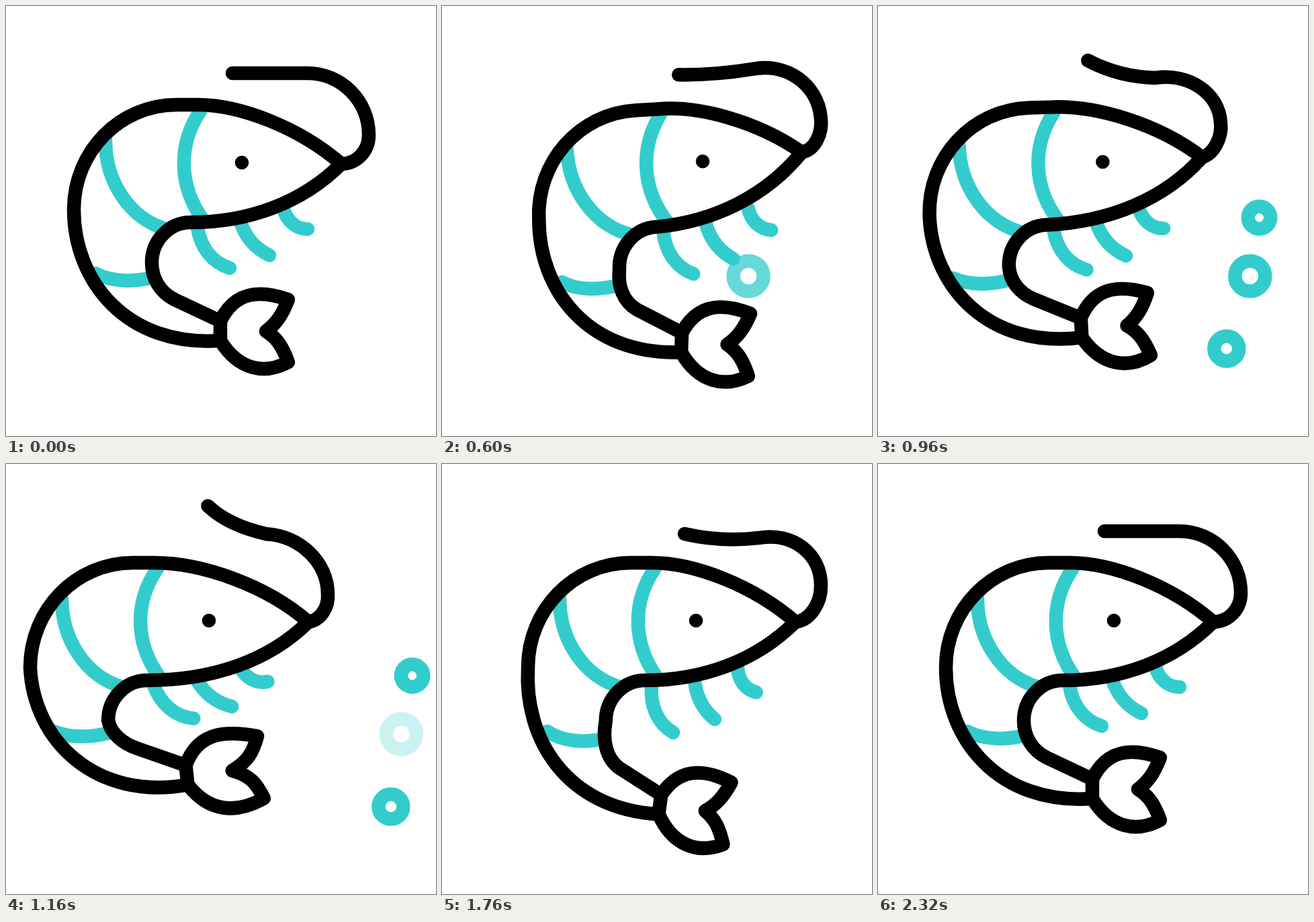
Animation, 640 px wide and 640 px high, one loop 2600 ms. Source, as an HTML page with a canvas:

```html
<!DOCTYPE html>
<html>
<head>
<meta charset="utf-8">
<style>
  html, body { margin: 0; height: 100%; overflow: hidden; background: #fff; }
  canvas { display: block; width: 100vmin; height: 100vmin; }
</style>
</head>
<body>
<canvas id="stage" width="640" height="640"></canvas>
<script>
const ctx = document.getElementById('stage').getContext('2d');
const LOOP = 2600, STEP = 40, WIDTH = 20.5, TEAL = '#3cc';

// The resting shape, as chains of cubic curves.
const feeler = [337,100, 374,100, 411,100, 448,100, 499,100, 540,141, 540,192, 540,216, 522,235, 499,235];
const back = [499,235, 438,182, 350,147, 285,147, 254,147, 169,147, 101,217, 101,303, 101,410, 180,508, 319,498];
const belly = [499,235, 440,294, 360,322, 275,322, 243,322, 217,349, 217,382, 217,405, 229,426, 251,437, 319,469];
const fin = [319,469, 340,426, 375,421, 420,437, 411,460, 402,473, 387,484,
  403,494, 411,506, 420,530, 385,549, 346,542, 319,498];
const bands = [
  [290,155, 256,205, 256,266, 293,318],
  [148,200, 148,262, 184,316, 238,332],
  [133,398, 158,411, 190,411, 218,404]
];
const legs = [
  [285,330, 290,360, 307,382, 333,390],
  [349,322, 357,345, 371,361, 392,371],
  [413,302, 418,320, 432,332, 449,332]
];
const EYE = [351, 233], BODY = [200, 300], TAIL_ROOT = [130, 330];

// The rig is at rest at the first and last key time.
const times = [200, 600, 800, 1160, 1480, 1760, 2320];
const rig = {
  headX: [37, 16, -49, -14, 27],
  bodyX: [43, 16, -65, -24, 27],
  tilt: [-6, -5.8, 0, 0, 0],      // head, in degrees
  turn: [2, 0, -6, -0.6, 7.5],    // tail, in degrees
  swing: [6, 9, -12, -7, 14],     // legs, in degrees
  wave: [8, 18, 9, 6, 16],        // feeler: height of its wave,
  curl: [0, 0, 1.6, 1.35, 0],     // phase of the wave and lift of the tip,
  pull: [8, 9, 12, 7, 3]          // drag to the left
};

const bubbles = [
  { start: 600, from: 519, to: 616, y: 315, r: 16.75 },
  { start: 480, from: 446.5, to: 589.5, y: 402, r: 22.5 },
  { start: 680, from: 476.5, to: 605, y: 510, r: 18.5 }
];
const LIFE = 720, FADE = 160;

const clamp = v => Math.max(0, Math.min(1, v));
const mix = (a, b, w) => a.map((v, i) => v + (b[i] - v) * w);

function rotate([x, y], [cx, cy], degrees) {
  const a = degrees * Math.PI / 180, c = Math.cos(a), s = Math.sin(a);
  return [cx + (x - cx) * c - (y - cy) * s, cy + (x - cx) * s + (y - cy) * c];
}

function warp(numbers, move) {
  const points = [];
  for (let i = 0; i < numbers.length; i += 2)
    points.push(move([numbers[i], numbers[i + 1]], i / 2));
  return points;
}

// Smooth curve through the key values, flat at both ends.
function keyed(keys, t) {
  const last = times.length - 1, v = [0, ...keys, 0];
  if (t <= times[0] || t >= times[last]) return 0;
  const slope = k => {
    if (k === 0 || k === last) return 0;
    const a = times[k] - times[k - 1], b = times[k + 1] - times[k];
    return ((v[k] - v[k - 1]) / a * b + (v[k + 1] - v[k]) / b * a) / (a + b);
  };
  const k = times.findIndex(time => time > t) - 1;
  const h = times[k + 1] - times[k], u = (t - times[k]) / h, w = 1 - u;
  return w * w * (1 + 2 * u) * v[k] + u * u * (3 - 2 * u) * v[k + 1]
    + h * u * w * (w * slope(k) - u * slope(k + 1));
}

function trace(points, lines = [], closed = false) {
  ctx.beginPath();
  ctx.moveTo(...points[0]);
  for (let i = 1; i < points.length;) {
    if (lines.includes(i)) {
      ctx.lineTo(...points[i++]);
    } else {
      ctx.bezierCurveTo(...points.slice(i, i + 3).flat());
      i += 3;
    }
  }
  if (closed) ctx.closePath();
  ctx.stroke();
}

function disc(x, y, r) {
  ctx.beginPath();
  ctx.arc(x, y, r, 0, 2 * Math.PI);
}

function drawBubble({ start, from, to, y, r }, t) {
  const age = t - start;
  if (age <= 0 || age >= LIFE) return;
  ctx.globalAlpha = clamp(Math.min(age, LIFE - age) / FADE);
  disc(from + (to - from) * (1 - Math.cos(Math.PI * age / LIFE)) / 2, y, r);
  ctx.stroke();
  ctx.globalAlpha = 1;
}

function draw(t) {
  const pose = {};
  for (const name in rig) pose[name] = keyed(rig[name], t);
  const { headX, bodyX, tilt, turn, swing, wave, curl, pull } = pose;

  const shift = ([x, y], dx, dy) => [x + dx, y + dy];
  const head = p => shift(rotate(p, EYE, tilt), headX, 0.3 * tilt);
  const body = p => shift(rotate(p, BODY, tilt / 2), bodyX, -1.8 * tilt);
  const tail = p => shift(rotate(p, TAIL_ROOT, turn), bodyX, -1.8 * tilt);
  const skin = p => {
    const front = mix(body(p), head(p), clamp((p[0] - 285) / 115));
    return mix(front, tail(p), clamp((p[1] - 380) / 50));
  };

  // The fin tips spread while the legs reach forward.
  const spread = Math.max(0, -0.8 * swing);
  const finPoint = ([x, y]) => tail([x + (x > 400 ? spread : 0), y]);

  const feelerPoint = (p, i) => {
    const s = i / 9, loose = Math.min(1, 4 * (1 - s)), tip = 18 * curl * (1 - s) ** 8;
    const sway = wave * (1 - 0.4 * s) * Math.sin(2 * Math.PI * s + 0.25 - curl);
    return shift(head(p), (0.85 * tip - pull) * loose, (sway - tip) * loose);
  };

  const drawLeg = leg => {
    const root = [leg[0], leg[1]];
    trace(warp(leg, p => shift(rotate(p, root, swing + tilt / 2),
      body(root)[0] - root[0], body(root)[1] - root[1])));
  };

  ctx.fillStyle = '#fff';
  ctx.fillRect(0, 0, 640, 640);
  ctx.lineWidth = WIDTH;
  ctx.lineCap = ctx.lineJoin = 'round';

  ctx.strokeStyle = TEAL;
  bubbles.forEach(bubble => drawBubble(bubble, t));
  bands.forEach(band => trace(warp(band, skin)));
  legs.forEach(drawLeg);

  ctx.strokeStyle = ctx.fillStyle = '#000';
  trace(warp(feeler, feelerPoint));
  trace(warp(back, skin), [4]);
  trace(warp(belly, skin), [10]);
  trace(warp(fin, finPoint), [], true);
  disc(...head(EYE), 10.3);
  ctx.fill();
}

function tick() {
  draw(Math.floor(performance.now() % LOOP / STEP) * STEP);
  requestAnimationFrame(tick);
}
tick();
</script>
</body>
</html>
```
